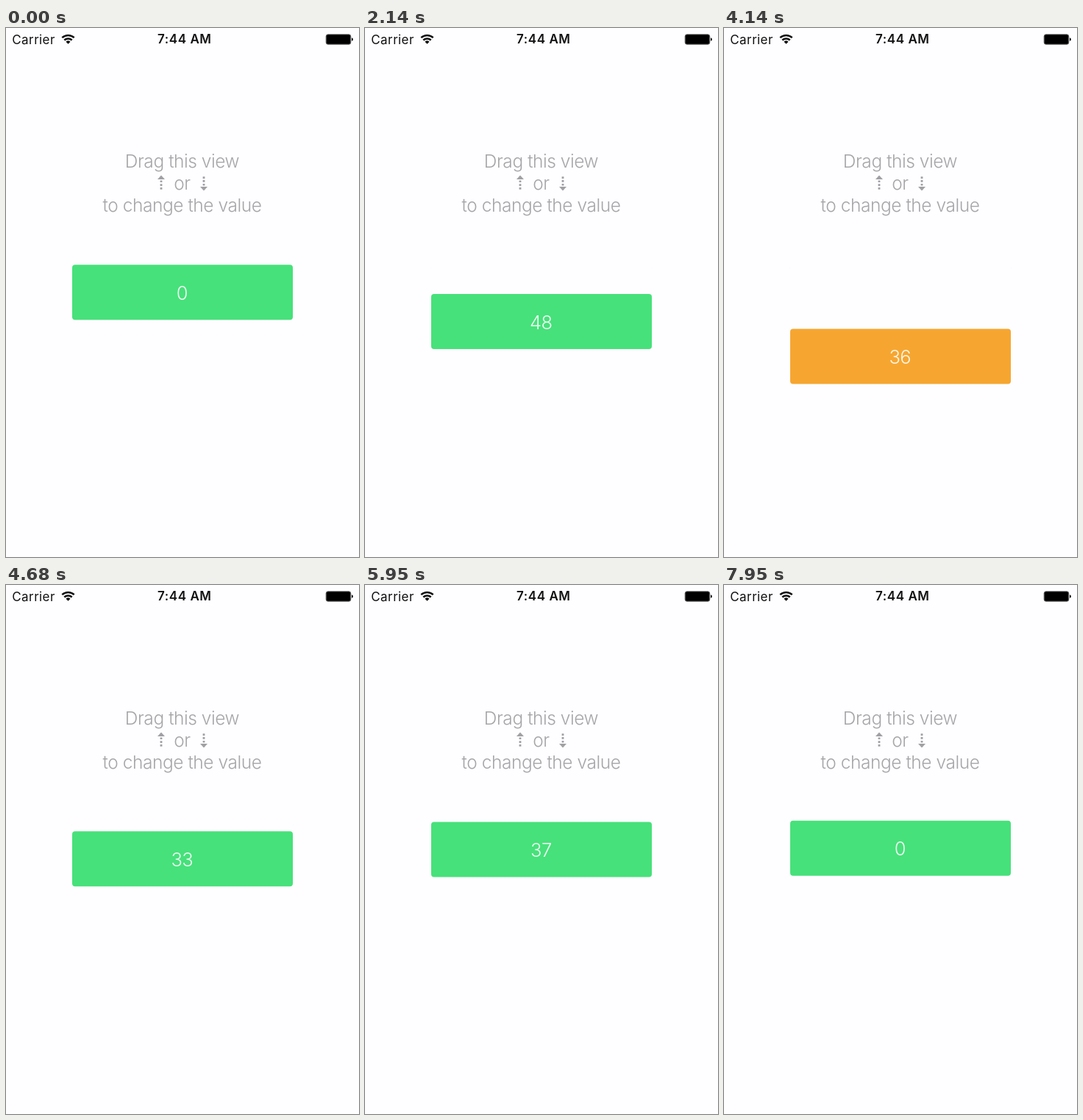
Recreate the animation shown at these times as an HTML page. Size 480 by 720 pixels, loop 8 s.

```html
<!DOCTYPE html>
<html lang="en">
<head>
<meta charset="utf-8">
<title>Drag to change the value</title>
<style>
  html, body { margin: 0; width: 100%; height: 100%; overflow: hidden; background: #fefdff; }
  svg { display: block; width: 480px; height: 720px; }
  text { font-family: Inter, "Liberation Sans", sans-serif; }
  .carrier { font-size: 17px; letter-spacing: .4px; fill: #111; }
  .clock { font-size: 17px; font-weight: 600; letter-spacing: .55px; fill: #111; text-anchor: middle; }
  .hint { font-size: 24.5px; font-weight: 300; letter-spacing: -.45px; fill: #a6a6a9; text-anchor: middle; }
  #value { font-size: 25.5px; font-weight: 300; letter-spacing: -.6px; fill: #fff; fill-opacity: .9; text-anchor: middle; }
</style>
</head>
<body>
<svg viewBox="0 0 480 720">
  <text class="carrier" x="8.3" y="21.5">Carrier</text>
  <text class="clock" x="242.8" y="21.4">7:44 AM</text>
  <g fill="none" stroke="#111" stroke-width="2.5">
    <path d="M76.3 13.2a12 12 0 0 1 16.4 0M79.3 16.5a7.6 7.6 0 0 1 10.4 0"/>
    <path d="M84.5 21.8l-3-3.1a4.3 4.3 0 0 1 6 0z" fill="#111" stroke="none"/>
  </g>
  <rect x="435.2" y="8.8" width="33.6" height="13.4" rx="2.5" stroke="#666"/>
  <path d="M470 13.2q2 .6 2 2.3t-2 2.3z" fill="#111"/>

  <g class="hint">
    <text x="239.5" y="190">Drag this view</text>
    <text x="239.5" y="220">or</text>
    <text x="239.5" y="250">to change the value</text>
  </g>
  <defs>
    <g id="arrow" fill="none" stroke="#a0a0a4">
      <path d="M0 -11l5 5.5h-10z" fill="#a0a0a4" stroke="none"/>
      <path d="M0 -4V9" stroke-width="2.8" stroke-dasharray="2.6 2.2"/>
    </g>
  </defs>
  <use href="#arrow" x="211" y="211.5"/>
  <use href="#arrow" transform="translate(269 210.5) scale(1 -1)"/>

  <g id="card">
    <rect id="box" x="90" width="300" height="75" rx="4"/>
    <text id="value" x="239.3" y="47.5"></text>
  </g>
</svg>
<script>
const LOOP = 8000, REST = 322.5, WRAP = 50;
const GREEN = [70, 225, 122], ORANGE = [246, 166, 48];
const [card, box, label] = ['card', 'box', 'value'].map(id => document.getElementById(id));

// Key points of each drag; the card springs back after the last one.
const key = (time, offset, value) => ({ time, offset, value });
const drags = [
  [key(1180, 0, 50), key(2140, 39.5, 48), key(2360, 39.5, 48), key(2860, 64.5, 46),
   key(4140, 87, 36), key(4770, -2, 33), key(5287, -84, 37)],
  [key(6550, 0, 37), key(7270, -16.5, 38), key(7550, -88, 50)]
];

const clamp = v => Math.max(0, Math.min(1, v));
const heat = offset => clamp((Math.abs(offset) - 40) / 34);
const easeInOut = p => p < .5 ? 4 * p ** 3 : 1 - 4 * (1 - p) ** 3;

// Smooth curve through the key points that never overshoots them.
function follow(keys, t, prop) {
  const rise = i => (keys[i + 1][prop] - keys[i][prop]) / (keys[i + 1].time - keys[i].time);
  const slope = i => {
    if (i === 0 || i === keys.length - 1) return 0;
    const a = rise(i - 1), b = rise(i);
    return a * b > 0 ? 2 * a * b / (a + b) : 0;
  };
  const i = keys.findIndex(k => k.time > t) - 1;
  const span = keys[i + 1].time - keys[i].time, u = (t - keys[i].time) / span;
  return keys[i][prop] + span * (rise(i) * u * u * (3 - 2 * u)
    + u * (1 - u) * (slope(i) * (1 - u) - slope(i + 1) * u));
}

function spring(from, ms) {
  const damping = .3, period = 200;
  const k = damping / Math.sqrt(1 - damping ** 2), x = 2 * Math.PI * ms / period;
  return from * Math.exp(-k * x) * (Math.cos(x) + k * Math.sin(x));
}

function pose(t) {
  // Before the first drag, the card is still settling from the previous loop.
  if (t < drags[0][0].time) t += LOOP;
  const keys = drags.filter(d => d[0].time <= t).pop();
  const last = keys[keys.length - 1], since = t - last.time;
  if (since < 0) {
    const offset = follow(keys, t, 'offset');
    return { offset, hot: heat(offset), value: follow(keys, t, 'value') };
  }
  return {
    offset: spring(last.offset, since),
    hot: heat(last.offset) * (1 - easeInOut(clamp(since / 400))),
    value: last.value
  };
}

function draw(t) {
  const { offset, hot, value } = pose(t);
  const rgb = GREEN.map((g, i) => Math.round(g + (ORANGE[i] - g) * hot));
  card.setAttribute('transform', `translate(0 ${(REST + offset).toFixed(2)})`);
  box.setAttribute('fill', `rgb(${rgb})`);
  label.textContent = Math.round(value) % WRAP;
}

const begin = performance.now();
function frame() {
  draw((performance.now() - begin) % LOOP);
  requestAnimationFrame(frame);
}
frame();
</script>
</body>
</html>
```
